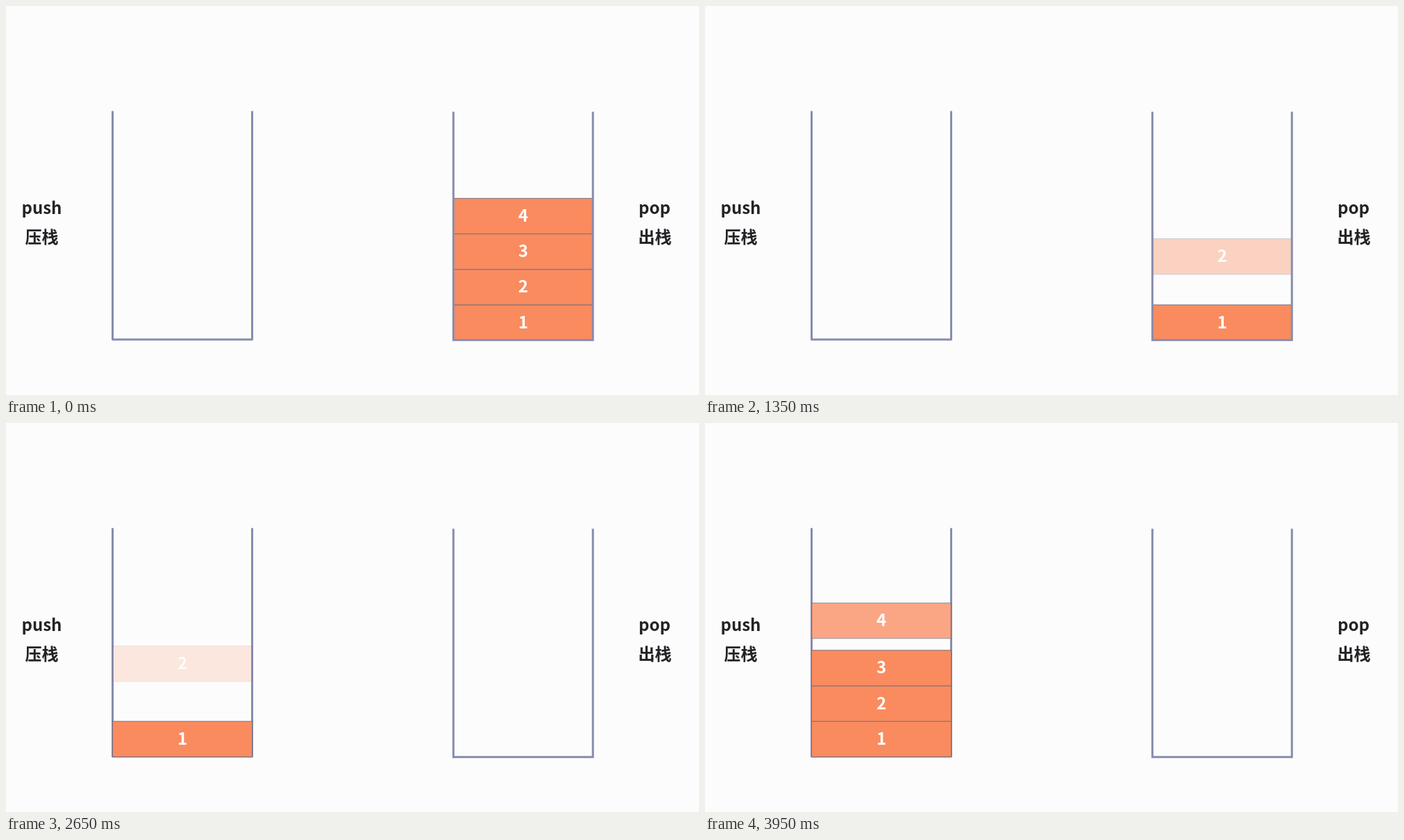
An HTML page that plays this animation: 998x561 px, repeating every 4 s.

```html
<!DOCTYPE html>
<html lang="zh-CN">
<head>
<meta charset="utf-8">
<title>Stack push and pop</title>
<style>
  html, body { margin: 0; width: 100%; height: 100%; overflow: hidden; background: #fcfcfc; }
  svg { display: block; width: 998px; height: 561px; }
  text { font: 700 24px "Noto Sans CJK SC", "Noto Sans CJK JP", "Noto Sans CJK", sans-serif; text-anchor: middle; }
  .label { fill: #232327; }
  .wall { fill: none; stroke: #878cae; stroke-width: 3; }
  .block rect { fill: #fa8b5e; stroke: #77727e; stroke-width: 1; }
  .block text { fill: #fff; }
</style>
</head>
<body>
<svg viewBox="0 0 998 561">
  <path class="wall" stroke-linejoin="round" d="M153.5 151.5V481H354.5V151.5"/>
  <g id="push"></g>
  <g id="pop"></g>
  <path class="wall" d="M644.3 152.5V481.7H845.2V152.5"/>
  <g class="label">
    <text x="51.5" y="300">push</text>
    <text x="51.5" y="342">压栈</text>
    <text x="934" y="300">pop</text>
    <text x="934.5" y="342">出栈</text>
  </g>
</svg>
<script>
const LOOP = 4000, STEP = 50, DURATION = 500, TRAVEL = 70, HEIGHT = 51.2;
const popStarts = [1539, 1035, 551, 45];       // by block number, 1 to 4
const pushStarts = [2055, 2560, 3065, 3572];

function add(parent, name, attributes) {
  const node = document.createElementNS("http://www.w3.org/2000/svg", name);
  for (const key in attributes) node.setAttribute(key, attributes[key]);
  return parent.appendChild(node);
}

function makeStack(id, x, width, bottom) {
  const parent = document.getElementById(id);
  return [1, 2, 3, 4].map(number => {
    const top = bottom - number * HEIGHT;
    const block = add(parent, "g", { class: "block" });
    add(block, "rect", { x, y: top, width, height: HEIGHT });
    add(block, "text", { x: x + width / 2, y: top + 33.6 }).textContent = number;
    return block;
  });
}

const popStack = makeStack("pop", 644.5, 200.5, 482.2);
const pushStack = makeStack("push", 153.4, 201.2, 481.4);

const progress = (time, start) => Math.min(1, Math.max(0, (time - start) / DURATION));

// lift: 0 is at rest and solid, 1 is fully raised and invisible
function place(block, lift) {
  block.setAttribute("transform", `translate(0 ${-TRAVEL * lift})`);
  block.setAttribute("opacity", 1 - lift);
}

function draw() {
  let time = Math.floor(performance.now() % LOOP / STEP) * STEP;
  if (time < 100) time = 0;
  popStack.forEach((block, i) => place(block, progress(time, popStarts[i])));
  pushStack.forEach((block, i) => place(block, 1 - progress(time, pushStarts[i])));
  requestAnimationFrame(draw);
}
draw();
</script>
</body>
</html>
```
